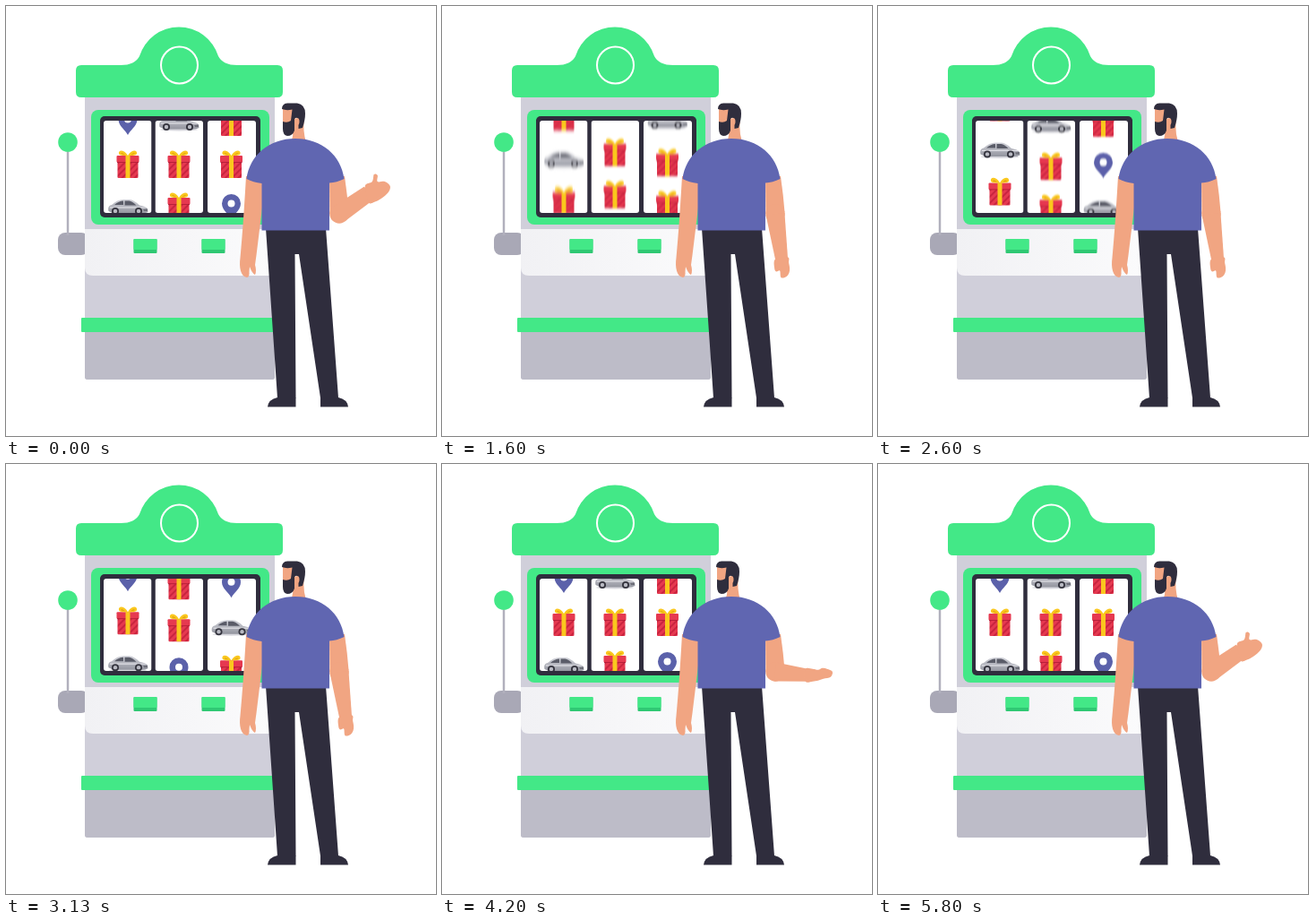
Recreate the animation shown at these times as an HTML page. Size 480x480 px, loop 6190 ms.

```html
<!DOCTYPE html>
<html lang="en">
<head>
<meta charset="utf-8">
<title>Slot machine</title>
<style>
html, body { margin: 0; width: 100%; height: 100%; overflow: hidden; background: #fff; }
svg { display: block; width: 100%; height: 100%; }
</style>
</head>
<body>
<svg viewBox="0 0 480 480">
  <defs>
    <clipPath id="window0"><rect x="109" y="128" width="53.5" height="103" rx="3"/></clipPath>
    <clipPath id="window1"><rect x="166.5" y="128" width="53.5" height="103" rx="3"/></clipPath>
    <clipPath id="window2"><rect x="225" y="128" width="54" height="103" rx="3"/></clipPath>
    <filter id="blur0" filterUnits="userSpaceOnUse" x="100" y="70" width="190" height="220"><feGaussianBlur stdDeviation="0 1"/></filter>
    <filter id="blur1" filterUnits="userSpaceOnUse" x="100" y="70" width="190" height="220"><feGaussianBlur stdDeviation="0 1"/></filter>
    <filter id="blur2" filterUnits="userSpaceOnUse" x="100" y="70" width="190" height="220"><feGaussianBlur stdDeviation="0 1"/></filter>
    <linearGradient id="desk"><stop offset="0" stop-color="#f1f1f4"/><stop offset="1" stop-color="#fbfbfc"/></linearGradient>
    <linearGradient id="metal" x2="0" y2="1"><stop offset="0" stop-color="#d3d4db"/><stop offset="1" stop-color="#92949e"/></linearGradient>
    <pattern id="stripes" width="5" height="5" patternUnits="userSpaceOnUse" patternTransform="rotate(45)">
      <rect width="5" height="5" fill="#e63950"/><rect width="2" height="5" fill="#c9243f"/>
    </pattern>
    <g id="gift">
      <rect x="-11.5" y="-5" width="23" height="20" rx="1" fill="url(#stripes)"/>
      <rect x="-12.5" y="-10" width="25" height="7.5" rx="1" fill="#e63950"/>
      <path d="M-12 -2.5H12" stroke="#b81f39" stroke-width="1"/>
      <rect x="-2.5" y="-10" width="5" height="25" fill="#fac71e"/>
      <path d="M0 -10C-4 -17 -11 -17 -10 -12Q-9 -9.500 0 -10C4 -17 11 -17 10 -12Q9 -9.500 0 -10Z" fill="#fac71e"/>
      <path d="M-3 -11Q-7 -14 -8 -12ZM3 -11Q7 -14 8 -12Z" fill="#d99b12"/>
    </g>
    <g id="pin">
      <path d="M0 14C-3 8 -10.500 4 -10.500 -3.500A10.500 10.500 0 0 1 10.500 -3.500C10.500 4 3 8 0 14Z" fill="#5b61aa"/>
      <circle cy="-3.500" r="4" fill="#fff"/>
    </g>
    <g id="car">
      <ellipse cx="0" cy="8" rx="21" ry="1.500" fill="#d8d8de"/>
      <path d="M-21.500 5Q-23 -1 -18 -2Q-12 -8 -5 -8H2Q7 -7.500 13 -1.500Q20 -.5 22 2.500L22.500 6Q19 8 12 7.500H-16Z" fill="url(#metal)"/>
      <path d="M-15 -2Q-10 -6.500 -5 -6.500V-2ZM-3.500 -6.500H1.500Q5 -6 9.500 -1.500H-3.500Z" fill="#5a5c68"/>
      <path d="M-20 1H20" stroke="#e9e9ee" stroke-width="1"/>
      <path d="M17 3L22 2.500V5H18Z" fill="#6d6e78"/>
      <g fill="#34343e"><circle cx="-14" cy="5" r="4"/><circle cx="12" cy="5" r="4"/></g>
      <g fill="#b9bac3"><circle cx="-14" cy="5" r="2.200"/><circle cx="12" cy="5" r="2.200"/></g>
    </g>
  </defs>

  <rect width="480" height="480" fill="#fff"/>

  <rect x="58" y="253" width="34" height="25" rx="8" fill="#a9a8b6"/>
  <path id="rod" stroke="#b1b0bd" stroke-width="2.500"/>
  <circle id="knob" cx="69" fill="#43e887"/>

  <path d="M88 96H300V414Q300 417 297 417H91Q88 417 88 414Z" fill="#d0cfda"/>
  <path d="M88 364H300V414Q300 417 297 417H91Q88 417 88 414Z" fill="#bdbcc8"/>
  <path d="M84 66H128Q144 66 149 56A46 46 0 0 1 237 56Q242 66 258 66H303Q309 66 309 72V96Q309 102 303 102H84Q78 102 78 96V72Q78 66 84 66Z" fill="#43e887"/>
  <circle cx="193.500" cy="66" r="20.500" fill="none" stroke="#fff" stroke-width="2"/>
  <rect x="95" y="116" width="199" height="128" rx="8" fill="#43e887"/>
  <rect x="105" y="123" width="179" height="113" rx="5" fill="#2f2d3d"/>
  <g id="reels"></g>
  <path d="M88 249H300V301H97Q88 301 88 292Z" fill="url(#desk)"/>
  <g fill="#2fc873"><rect x="142.500" y="260" width="26" height="16" rx="1"/><rect x="218.500" y="260" width="26" height="16" rx="1"/></g>
  <g fill="#43e887"><rect x="142.500" y="260" width="26" height="12" rx="1"/><rect x="218.500" y="260" width="26" height="12" rx="1"/></g>
  <rect x="84" y="348" width="220" height="16" rx="1" fill="#43e887"/>

  <g fill="#2f2d3d">
    <path d="M290 248H357L371 437.500H351L327 277H322.500L323.500 437.500H303Z"/>
    <path d="M292 447.500Q293 439 303 437H323.500V447.500ZM351 447.500V437H371Q381 439 382 447.500Z"/>
  </g>
  <g fill="#f1a582">
    <path d="M268 190C266 225 264 255 261.500 281C260 292 262 302 269 303Q272 303 271.500 296L272 291Q275 299 278 300Q280 296 278 289L279.500 278L286 225V190Z"/>
    <path d="M361 190H378Q381 211 382.500 230L361.500 232Z"/>
    <circle cx="372" cy="232" r="10.700"/>
    <path id="forearm"/>
    <path id="hand"/>
  </g>
  <g id="head">
    <path d="M321 126H333Q331 139 335 152H317Q321 147 320 141Z" fill="#f1a582"/>
    <path d="M309 114H323V137H309Z" fill="#f1a582"/>
    <path d="M308 115Q308 109 314 108.500H325Q334 110 334 120Q334 127 331 136L326.500 137V127Q325 123 322 126V139Q320 145 314 145Q309 144 309 137V129Q314 131 318 128L319.500 115.500Q313 117 308 115Z" fill="#2f2d3d"/>
    <ellipse cx="325" cy="129" rx="2.500" ry="4" fill="#f1a582"/>
  </g>
  <path d="M268.500 193C272 167 293 148 323 148C353 148 374 167 377.500 193Q369 197 361 197.500V250.500H285.500V198Q276 197 268.500 193Z" fill="#6066b1"/>
</svg>
<script>
const LOOP = 6190, STEP = 1000 / 15, LAST = 5800, GAP = 47, MID = 177;
const $ = id => document.getElementById(id);
const mix = (a, b, u) => a + (b - a) * u;

// Monotone cubic through [time, value] keys, flat at both ends.
function track(keys) {
  const n = keys.length - 1;
  const rate = i => (keys[i + 1][1] - keys[i][1]) / (keys[i + 1][0] - keys[i][0]);
  const slope = keys.map((_, i) => {
    if (i === 0 || i === n) return 0;
    const a = rate(i - 1), b = rate(i);
    return a * b > 0 ? 2 * a * b / (a + b) : 0;
  });
  return t => {
    if (t <= keys[0][0]) return keys[0][1];
    if (t >= keys[n][0]) return keys[n][1];
    let i = 0;
    while (t > keys[i + 1][0]) i++;
    const [t0, a] = keys[i], [t1, b] = keys[i + 1];
    const h = t1 - t0, u = (t - t0) / h, s = u * u * (3 - 2 * u);
    return mix(a, b, s) + h * u * (1 - u) * ((1 - u) * slope[i] - u * slope[i + 1]);
  };
}

const reels = [
  { x: 136, strip: ["car", "gift", "pin", "gift"],
    pos: track([[400, 1], [867, 3.23], [1600, 11.87], [2133, 17.38], [3133, 20.96], [3300, 21]]) },
  { x: 193, strip: ["gift", "gift", "car", "pin"],
    pos: track([[450, 1], [867, 2.32], [1600, 8.72], [2133, 13.3], [3133, 20.13], [3600, 21]]) },
  { x: 251.5, strip: ["gift", "gift", "car", "pin"],
    pos: track([[450, 0], [867, 2.09], [1600, 8.96], [2133, 15.13], [3133, 22.11], [3933, 24]]) }
];
const lever = track([[67, 0], [600, 1], [900, 1], [1330, 0]]);
const pose = track([[67, 2], [400, 1], [860, 0], [3900, 0], [4200, 1], [4750, 2]]);
const headX = track([[3867, 0], [4200, -2], [4800, 0]]);
const headY = track([[3800, 0], [4050, -4], [4200, 0]]);

// Arm poses: hanging, reaching out, thumb up.
const arms = [
  { angle: 82, length: 51, wrist: 7, turn: 90,
    hand: [-2,-7, 4,-8, 10,-9, 15,-8.5, 19,-6, 21,-2, 20,1, 13,2, 14,6, 10,8, 0,7] },
  { angle: 6, length: 36, wrist: 7, turn: 0,
    hand: [-2,-7, 6,-7, 12,-6, 17,-8, 22,-7, 28,-4, 26,2, 18,4, 12,6, 6,7, -2,7] },
  { angle: -35, length: 40, wrist: 9, turn: 0,
    hand: [-4,-8, 4,-13, 6,-21, 10,-20, 10,-13, 18,-13, 24,-8, 22,-1, 14,6, 6,10, 0,10] }
];

reels.forEach((r, i) => {
  const [left, width] = [[109, 53.5], [166.5, 53.5], [225, 54]][i];
  $("reels").insertAdjacentHTML("beforeend",
    `<g clip-path="url(#window${i})"><rect x="${left}" y="128" width="${width}" height="103" fill="#fff"/>
     <g class="strip">${r.strip.map(s => `<use href="#${s}"/>`).join("")}</g></g>`);
  r.group = $("reels").lastElementChild.querySelector(".strip");
  r.blur = $("blur" + i).firstElementChild;
});

function smooth(p) {
  const n = p.length / 2, at = i => [p[(i + n) % n * 2], p[(i + n) % n * 2 + 1]];
  let d = "M" + at(0);
  for (let i = 0; i < n; i++) {
    const [a, b, c, e] = [-1, 0, 1, 2].map(k => at(i + k));
    const c1 = b.map((v, k) => v + (c[k] - a[k]) / 6);
    const c2 = c.map((v, k) => v - (e[k] - b[k]) / 6);
    d += `C${c1} ${c2} ${c}`;
  }
  return d + "Z";
}

function drawReel(r, i, t) {
  const p = r.pos(t), n = r.strip.length;
  [...r.group.children].forEach((use, k) => {
    const off = (((p - k + n / 2) % n) + n) % n - n / 2;
    use.setAttribute("transform", `translate(${r.x} ${MID + off * GAP})`);
  });
  const speed = (r.pos(t + 10) - r.pos(t - 10)) * 50;
  const sd = Math.min(2, speed * 0.17);
  if (sd > 0.15) {
    r.blur.setAttribute("stdDeviation", `0 ${sd.toFixed(2)}`);
    r.group.setAttribute("filter", `url(#blur${i})`);
  } else r.group.removeAttribute("filter");
}

function drawArm(q) {
  const i = q < 1 ? 0 : 1, a = arms[i], b = arms[i + 1], u = q - i;
  const get = key => mix(a[key], b[key], u);
  const len = get("length"), w = get("wrist"), deg = get("angle"), rad = deg * Math.PI / 180;
  $("forearm").setAttribute("d", `M0 -10.500L${len} ${-w}Q${len + 4} 0 ${len} ${w}L0 10.500Z`);
  $("forearm").setAttribute("transform", `translate(372 232) rotate(${deg})`);
  $("hand").setAttribute("d", smooth(a.hand.map((v, k) => mix(v, b.hand[k], u))));
  $("hand").setAttribute("transform",
    `translate(${372 + len * Math.cos(rad)} ${232 + len * Math.sin(rad)}) rotate(${get("turn")})`);
}

function draw(t) {
  reels.forEach((r, i) => drawReel(r, i, t));
  const pull = lever(t), y = mix(152, 252, pull);
  $("knob").setAttribute("cy", y);
  $("knob").setAttribute("r", mix(10.8, 13.2, pull));
  $("rod").setAttribute("d", `M69 ${y}V256`);
  drawArm(pose(t));
  $("head").setAttribute("transform", `translate(${headX(t)} ${headY(t)})`);
}

function tick() {
  const t = performance.now() % LOOP;
  draw(Math.min(LAST, Math.floor((t + 4) / STEP) * STEP));
  requestAnimationFrame(tick);
}
tick();
</script>
</body>
</html>
```
